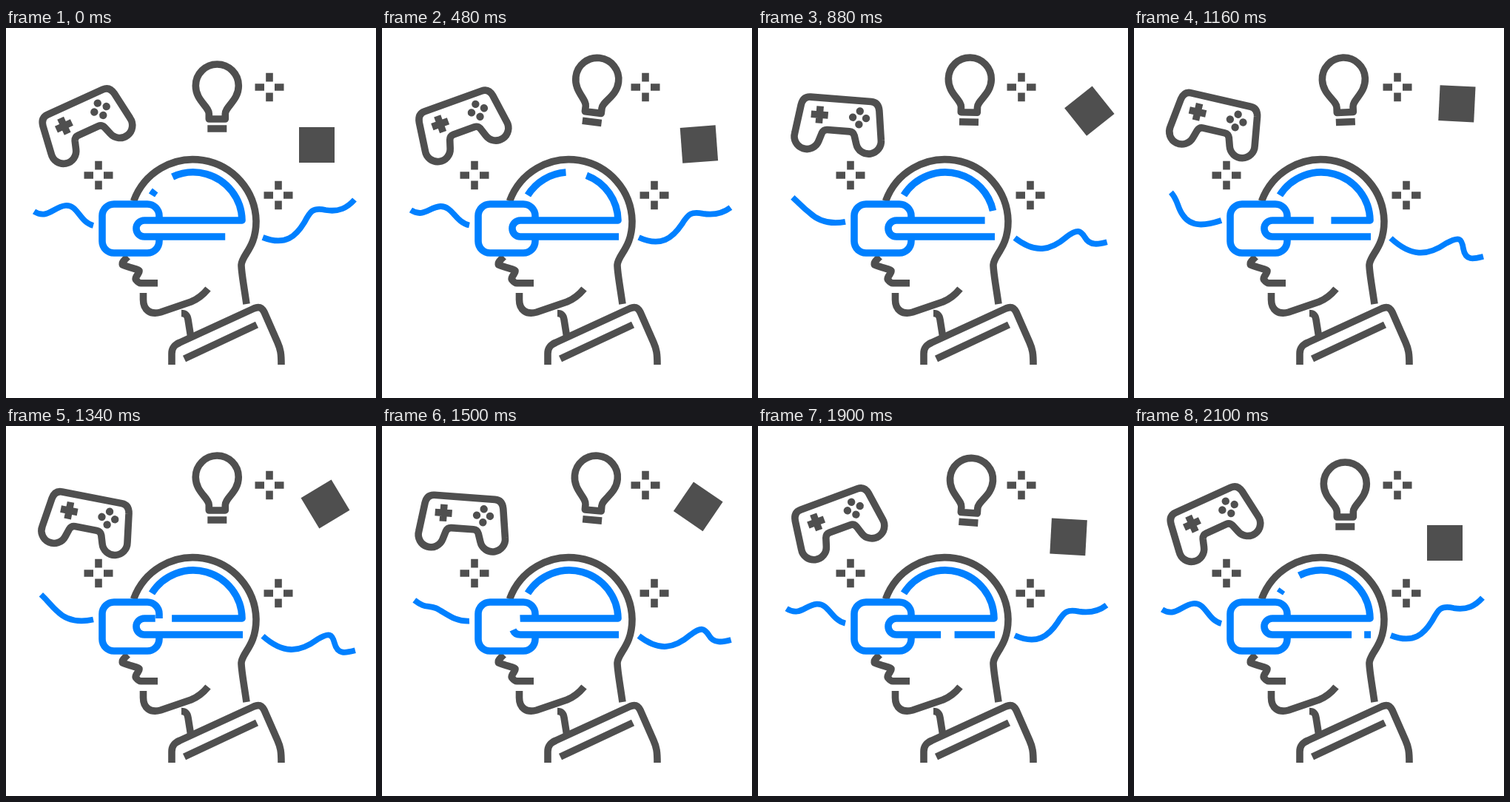
Recreate the animation shown at these times as an HTML page without scripts. Size 500 by 500 pixels, loop 2260 ms.

```html
<!DOCTYPE html>
<html lang="en">
<head>
<meta charset="utf-8">
<title>Virtual reality</title>
<style>
  html, body { margin: 0; width: 100%; height: 100%; overflow: hidden; background: #fff; }
  svg { display: block; width: 100%; height: 100%; }
  .line { fill: none; stroke: #4f4f4f; stroke-width: 9.6; stroke-linejoin: round; }
  .blue { stroke: #0080ff; }
  .wave { stroke-width: 7.8; }
  .solid { fill: #4f4f4f; }

  .pad, .bulb, .tile, .strap, .wave { animation: 2260ms linear 10ms infinite backwards; }
  .pad { animation-name: tilt; }
  .bulb { animation-name: wobble; }
  .tile { animation-name: drift, turn; }
  .strap { animation-name: flow; }
  .left {
    --high: path("M38 248C56 259 64 242 80 240C97 238 99 262 118 267");
    --low: path("M50 222C60 233 58 242 66 253C77 270 97 267 118 260");
    animation-name: left;
  }
  .right {
    --high: path("M347 283C378 295 392 281 403 263C411 248 414 242 432 246C450 249 461 243 471 232");
    --mid: path("M347 283C376 299 394 287 408 268C418 254 424 255 436 257C449 259 461 259 471 256");
    --low: path("M347 284C374 309 396 309 422 291C440 281 443 285 445 298C448 316 460 312 472 309");
    animation-name: right;
  }

  @keyframes tilt {
    0%, 10.62% { rotate: -24.6deg; animation-timing-function: ease-in-out; }
    52.21% { rotate: 13deg; animation-timing-function: ease-in-out; }
    93.4%, 100% { rotate: -24.6deg; }
  }
  @keyframes wobble {
    0%, 10.62% { translate: 0 0; rotate: 0deg; animation-timing-function: ease-in-out; }
    21.24% { translate: 0 -9px; rotate: 7deg; animation-timing-function: ease-in-out; }
    52.21% { translate: 0 -9px; rotate: -2.5deg; animation-timing-function: ease-in-out; }
    70.8%, 76.99% { translate: 0 -9px; rotate: 6.4deg; animation-timing-function: ease-in-out; }
    92.92%, 100% { translate: 0 0; rotate: 0deg; }
  }
  @keyframes drift {
    0%, 10.62% { translate: 420px 158px; animation-timing-function: ease-in; }
    21.24% { translate: 429px 157px; }
    30.09% { translate: 445px 136px; }
    38.94% { translate: 448px 111px; }
    51.33% { translate: 436px 102px; }
    66.37% { translate: 427px 109px; }
    76.99% { translate: 419px 138px; animation-timing-function: ease-out; }
    92.92%, 100% { translate: 420px 158px; }
  }
  @keyframes turn {
    0%, 10.62% { rotate: 0deg; animation-timing-function: cubic-bezier(.5, 0, .5, 1); }
    92.5%, 100% { rotate: -180deg; }
  }
  @keyframes flow {
    0%, 10.62% { stroke-dasharray: 500 30 407 30 407 60; stroke-dashoffset: 929; }
    92.92%, 100% { stroke-dasharray: 500 30 407 17 407 60; stroke-dashoffset: 492; }
  }
  @keyframes left {
    0%, 10.62% { d: var(--high); animation-timing-function: cubic-bezier(.6, 0, .65, 1); }
    49.56% { d: var(--low); animation-timing-function: cubic-bezier(.25, 0, .4, 1); }
    92.92%, 100% { d: var(--high); }
  }
  @keyframes right {
    0%, 10.62% { d: var(--high); animation-timing-function: ease-in; }
    27.4% { d: var(--mid); animation-timing-function: ease-out; }
    52.21% { d: var(--low); animation-timing-function: ease-in; }
    76.99% { d: var(--mid); animation-timing-function: ease-out; }
    93.4%, 100% { d: var(--high); }
  }
</style>
</head>
<body>
<svg viewBox="0 0 500 500">
  <defs>
    <path id="spark" class="line" d="M0-19.3V-7.5M0 7.5V19.3M-19.5 0H-7M7 0H19.5"/>
    <circle id="dot" class="solid" r="5.2"/>
  </defs>

  <use href="#spark" x="125" y="199"/>
  <use href="#spark" x="356" y="80"/>
  <use href="#spark" x="368" y="226"/>

  <!-- head, face and collar -->
  <g class="line">
    <path d="M172.5 234A85.3 85.3 0 0 1 338 261C338 297 319 306 318 320C318 330 321 345 325 373"/>
    <path d="M164.5 309C160.500 313 156 317 157.500 320C160 322 180 326 180 328C181 331 173.500 337 175.500 340C178 343 179 344.700 182 344.700H205"/>
    <path d="M185.500 358V367C185.500 381 195 388 209 384L250 370C260 366 266 361 273 352.500"/>
    <path d="M237 385.500C243 385.500 245 388 246 394L250 419"/>
    <path d="M224 455V440C224 432 228 428 235 425L335 379C342 376 346 378 349 384L367 425C371 434 372 440 372 455"/>
    <path d="M241 447L339 401"/>
  </g>

  <!-- headset -->
  <path class="line blue" d="M207 260V254A16 16 0 0 0 191 238H146A16 16 0 0 0 130 254V288A16 16 0 0 0 146 304H191A16 16 0 0 0 207 288V282"/>
  <path class="line blue strap" d="M197 226A66 66 0 0 1 319 260H187A11 11 0 0 0 187 282H320"/>

  <path class="line blue wave left" d="M38 248"/>
  <path class="line blue wave right" d="M347 283"/>

  <!-- gamepad -->
  <g transform="translate(110 134)">
    <g class="pad">
      <g transform="translate(-1 .8)">
        <path class="line" d="M-41-38.5H41Q51-38.5 53-27L58.500 12A17 17 0 0 1 25.500 20L22 9Q20 4 15 4H-15Q-20 4-22 9L-25.500 20A17 17 0 0 1-58.500 12L-53-27Q-51-38.5-41-38.5Z"/>
        <path class="line" d="M-38.5-15.5H-15.5M-27-27V-4"/>
        <use href="#dot" x="27" y="-24.5"/>
        <use href="#dot" x="36" y="-15.5"/>
        <use href="#dot" x="27" y="-6.5"/>
        <use href="#dot" x="18" y="-15.5"/>
      </g>
    </g>
  </g>

  <!-- light bulb, pivoting at its neck -->
  <g transform="translate(285.3 123)">
    <g class="bulb">
      <path class="line" d="M-11 0V-7C-11-17-29-25-29-45A29 29 0 0 1 29-45C29-25 11-17 11-7V0ZM-13 13H13"/>
    </g>
  </g>

  <rect class="solid tile" x="-24" y="-24" width="48" height="48"/>
</svg>
</body>
</html>
```
